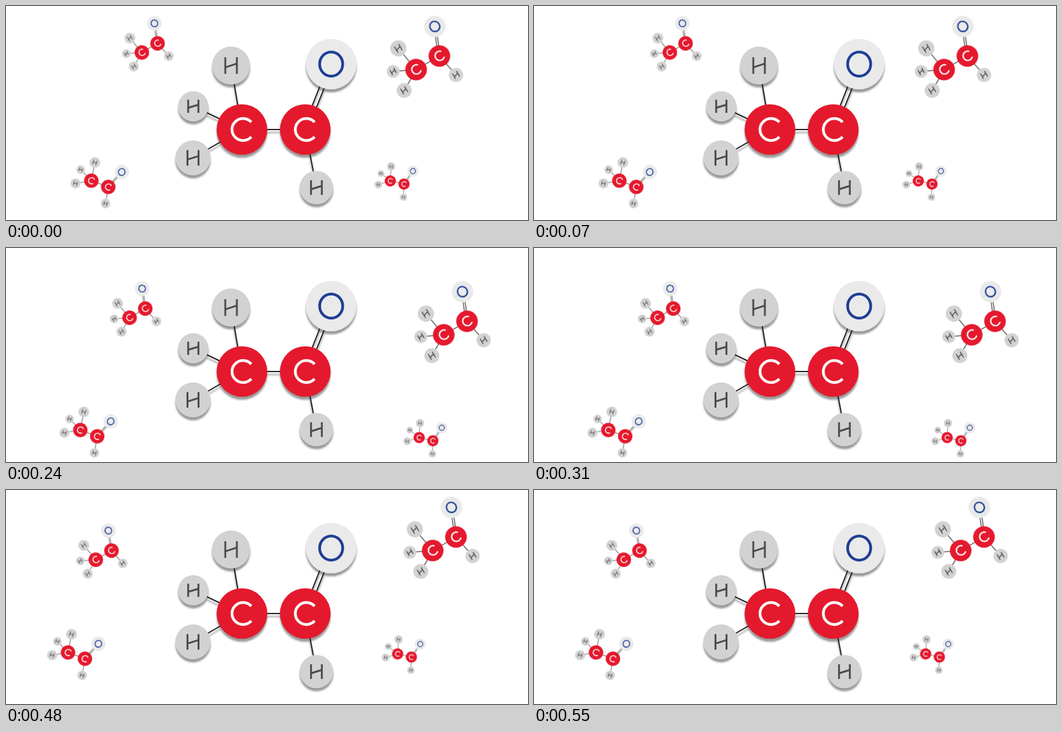
Recreate the animation shown at these times as an HTML page. Size 850x350 px, loop 600 ms.

```html
<!DOCTYPE html>
<html lang="en">
<head>
<meta charset="utf-8">
<title>Molecules</title>
<style>
  html, body { margin: 0; width: 100%; height: 100%; overflow: hidden; background: #fff; }
  svg { display: block; }
  .bond { stroke: #222; stroke-width: 2; }
  .sign { fill: none; stroke-width: 4.5; }
  .H { stroke: #4d4a48; stroke-width: 3; }
  .C { stroke: #fff; }
  .O { stroke: #1f3f95; }
  .main { filter: drop-shadow(0 5.5px 1.5px rgba(0, 0, 0, .4)); }
  .copy .bond { stroke-width: 2.6; }
  .copy .sign { stroke-width: 5.4; }
  .copy .H { stroke-width: 3.5; }
</style>
</head>
<body>
<svg id="stage" width="850" height="350" viewBox="0 0 850 350"></svg>
<script>
const stage = document.getElementById('stage');
const fills = { H: '#d2d2d2', C: '#e5192d', O: '#eaeaea' };

// Each atom hangs on the left or right carbon; r defaults to the large size.
const atom = (kind, x, y, r = 41.3) => ({ kind, x, y, r });
const left = atom('C', 384.2, 202);
const right = atom('C', 487.3, 202);
const oxygen = atom('O', 529.5, 95);
const leftHs = [atom('H', 366.5, 97.3, 31), atom('H', 305, 164, 24.7), atom('H', 304.5, 248.3, 28.6)];
const rightH = atom('H', 505.5, 297, 27.3);

// Successive places of the left carbon in each small molecule.
const copies = [
  { turn: -30.3, size: .287, path: [[221.2, 76], [201.2, 76], [201.2, 114], [130.2, 114], [146.2, 114]] },
  { turn: -30.3, size: .426, path: [[667.8, 104], [691.8, 128], [712.8, 142], [730.8, 121], [694.8, 99]] },
  { turn: 20.4, size: .285, path: [[139, 285.7], [149, 275.7], [121, 297.7], [133, 276.7], [101, 265.7]] },
  { turn: 13, size: .222, path: [[625.8, 286], [635.8, 296], [672.8, 310], [636.8, 310], [637.8, 268]] }
];

function add(parent, tag, attrs = {}) {
  const el = document.createElementNS('http://www.w3.org/2000/svg', tag);
  for (const key in attrs) el.setAttribute(key, attrs[key]);
  return parent.appendChild(el);
}

// Line between two centres, moved sideways for double bonds.
function drawBond(parent, a, b, side = 0) {
  const length = Math.hypot(b.x - a.x, b.y - a.y);
  const dx = -(b.y - a.y) / length * side, dy = (b.x - a.x) / length * side;
  add(parent, 'line', { class: 'bond', x1: a.x + dx, y1: a.y + dy, x2: b.x + dx, y2: b.y + dy });
}

const signs = {
  H(r) {
    const w = 4 + r * .175, h = r * .44, tilt = r * .1;
    return `M${-w} ${-h}v${2 * h}M${w} ${-h}v${2 * h}M${-w} ${tilt}L${w} ${-tilt}`;
  },
  C: () => 'M15.2 -12A18 18 0 1 0 15.2 12',
  O: () => 'M-18.8 0a18.8 19.8 0 1 0 37.6 0a18.8 19.8 0 1 0 -37.6 0z'
};

function drawAtom(parent, { kind, x, y, r }) {
  const g = add(parent, 'g', { transform: `translate(${x} ${y})` });
  add(g, 'circle', { r, fill: fills[kind] });
  add(g, 'path', { class: `sign ${kind}`, d: signs[kind](r) });
}

function drawMolecule(parent, attrs) {
  const g = add(parent, 'g', { role: 'img', 'aria-label': 'CH3CHO', ...attrs });
  for (const h of leftHs) drawBond(g, left, h);
  drawBond(g, left, right);
  drawBond(g, right, rightH);
  for (const side of [-3.8, 3.8]) drawBond(g, right, oxygen, side);
  for (const a of [...leftHs, rightH, left, right, oxygen]) drawAtom(g, a);
}

drawMolecule(stage, { class: 'main' });

for (const { turn, size, path } of copies) {
  const mover = add(stage, 'g');
  drawMolecule(mover, {
    class: 'copy',
    transform: `rotate(${turn}) scale(${size}) translate(${-left.x} ${-left.y})`
  });
  const steps = [...path, path[0]].map(([x, y]) => ({
    transform: `translate(${x}px, ${y}px)`,
    easing: 'steps(1, end)'
  }));
  mover.animate(steps, { duration: 600, iterations: Infinity });
}
</script>
</body>
</html>
```
